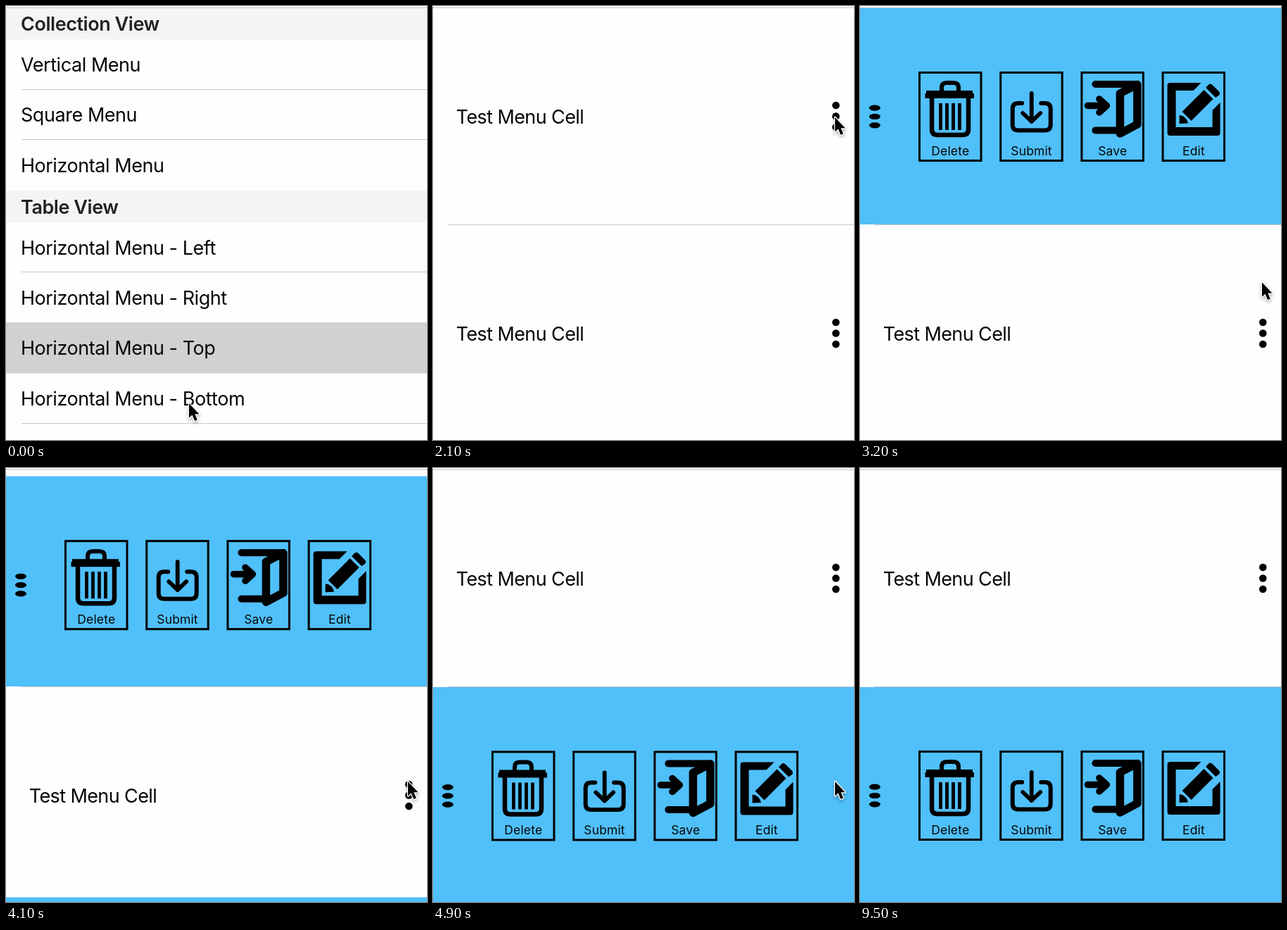
These frames come from a looping animation (598 px wide and 616 px high, 9.6 s). An HTML page with a canvas:

```html
<!DOCTYPE html>
<html lang="en">
<head>
<meta charset="utf-8">
<title>Slide-out cell menu</title>
<style>
html, body { margin: 0; width: 598px; height: 616px; overflow: hidden; background: #fefdff; }
canvas { display: block; width: 598px; height: 616px; }
</style>
</head>
<body>
<canvas id="stage" width="598" height="616"></canvas>
<script>
const W = 598, H = 616, LOOP = 9600, STEP = 100;
const PAGE_W = 602, CELL_H = 308, SLIDE = 940;
const WHITE = '#fefdff', LINE = '#c9c8cc', BLUE = '#50c0fa';
const ctx = document.getElementById('stage').getContext('2d');

const clamp = x => Math.min(1, Math.max(0, x));
const easeOut = x => 1 - (1 - x) ** 2;
const easeIn = x => x * x;
const linear = x => x;

// cubic-bezier(.42, 0, .58, 1)
function easeInOut(x) {
  let lo = 0, hi = 1;
  for (let i = 0; i < 24; i++) {
    const s = (lo + hi) / 2;
    const bx = 1.26 * s * (1 - s) ** 2 + 1.74 * s * s * (1 - s) + s ** 3;
    if (bx < x) lo = s; else hi = s;
  }
  return lo * lo * (3 - 2 * lo);
}
const slide = (t, start) => easeInOut(clamp((t - start) / SLIDE));

// critically damped spring
function spring(t) {
  const k = Math.max(0, t) * 0.017;
  return 1 - (1 + k) * Math.exp(-k);
}

function rect(color, x, y, w, h) {
  ctx.fillStyle = color;
  ctx.fillRect(x, y, w, h);
}

function text(str, x, y, { weight = 400, size = 27, spacing = -0.45, align = 'left', color = '#060606' } = {}) {
  ctx.font = `${weight} ${size}px Inter, sans-serif`;
  ctx.letterSpacing = spacing + 'px';
  ctx.textAlign = align;
  ctx.fillStyle = color;
  ctx.fillText(str, x, y);
}

function dots(x, y, rx, ry, gap) {
  ctx.fillStyle = '#000';
  for (const i of [-1, 0, 1]) {
    ctx.beginPath();
    ctx.ellipse(x, y + i * gap, rx, ry, 0, 0, 7);
    ctx.fill();
  }
}

function stroke(d, width, cap = 'round') {
  ctx.strokeStyle = '#000';
  ctx.lineWidth = width;
  ctx.lineCap = cap;
  ctx.lineJoin = 'round';
  ctx.stroke(new Path2D(d));
}

function fill(d) {
  ctx.fillStyle = '#000';
  ctx.fill(new Path2D(d));
}

const items = [
  ['Delete', () => {
    stroke('M33 28V23q0-7 7-7h10q7 0 7 7V28', 6, 'butt');
    fill('M11 27H77V31H79V38H9.500V31H11Z');
    stroke('M19 37V82q0 8 8 8H63q8 0 8-8V37', 6.5, 'butt');
    stroke('M31.500 45V83M40.500 45V83M49.500 45V83M58.500 45V83', 4.8, 'butt');
  }],
  ['Submit', () => {
    stroke('M32 45H26.500q-8 0-8 8V75.500q0 8 8 8H64.500q8 0 8-8V53q0-8-8-8H59', 6);
    stroke('M45.500 31V71M33 59L45.500 71L58 59', 5.8);
  }],
  ['Save', () => {
    stroke('M21 18H80M21 83.500H52', 10);
    stroke('M56 31L80.500 18.500V75L56 88Z', 11.5);
    stroke('M10 48.500H36M26.500 39L37 48.500L26.500 58', 9.5);
  }],
  ['Edit', () => {
    fill('M12 16H56L45 27H20V79H72V55L83 44V87q0 4-4 4H12q-4 0-4-4V20q0-4 4-4Z');
    fill('M29 57L60 26L73 39L42 70Z');
    fill('M25 74V62q10 1 12.500 11.500Z');
    fill('M62.500 23L66 19q3-3 6 0L81 28q3 3 0 6L76.500 37Z');
  }]
];

function menu(y) {
  rect(BLUE, 0, y, W, CELL_H);
  dots(21, y + 154.5, 8, 4.1, 12.3);
  items.forEach(([label, icon], i) => {
    ctx.save();
    ctx.translate(83 + i * 115.2, y + 90.5);
    ctx.strokeStyle = '#000';
    ctx.lineWidth = 3;
    ctx.lineJoin = 'miter';
    ctx.strokeRect(1.5, 1.5, 87.5, 125);
    icon();
    text(label, 45.3, 118.5, { size: 17.5, spacing: 0.15, align: 'center' });
    ctx.restore();
  });
}

function listPage(selected) {
  const rowH = 71.4;
  const section = (title, y, rows) => {
    rect('#f4f3f6', -20, y, 900, 45);
    text(title, 21, y + 32.5, { weight: 600, color: '#222224' });
    rows.forEach((row, i) => {
      const top = y + 45 + i * rowH;
      if (row === selected) rect('#d1d0d3', -20, Math.round(top) - 1, 900, rowH + 1);
      text(row, 21, top + 45.5);
      if (row !== selected && (i < rows.length - 1 || rows.length > 3)) {
        rect(LINE, 22, Math.round(top + rowH) - 1, 900, 1);
      }
    });
  };
  rect(WHITE, -20, 0, 900, H);
  section('Collection View', 2.5, ['Vertical Menu', 'Square Menu', 'Horizontal Menu']);
  section('Table View', 262, ['Left', 'Right', 'Top', 'Bottom'].map(s => 'Horizontal Menu - ' + s));
}

function cell(top, open) {
  ctx.save();
  ctx.beginPath();
  ctx.rect(-3, Math.round(top), PAGE_W, CELL_H - 1);
  ctx.clip();
  text('Test Menu Cell', 32.7, top + 164, { spacing: -0.6 });
  dots(572.3, top + 154, 5.3, 5.3, 15.5);
  if (open > 0) menu(top + CELL_H * (1 - open));
  ctx.restore();
}

function cellPage(t) {
  rect(WHITE, -3, 0, PAGE_W + 40, H);
  rect(LINE, 21, 310, W, 1);
  const second = slide(t, 3985);
  cell(2.5, slide(t, 2255) - second);
  cell(310.5, second);
}

// start, end, from, to, easing
const moves = [
  [850, 1300, [260, 564], [389, 322], easeIn],
  [1300, 2100, [389, 322], [571, 158], easeOut],
  [2800, 3500, [571, 158], [571, 445], easeOut],
  [4950, 5500, [571, 445], [108, -40], linear]
];

function cursor(t) {
  const [start, end, a, b, ease] = moves.filter(m => t >= m[0]).pop() || moves[0];
  const k = ease(clamp((t - start) / (end - start)));
  ctx.save();
  ctx.translate(a[0] + (b[0] - a[0]) * k, a[1] + (b[1] - a[1]) * k);
  const arrow = new Path2D('M0 0V20.500L4.500 16.500L8.200 25L11.800 23.300L8.300 15.200H14.500Z');
  ctx.shadowColor = 'rgba(0,0,0,.35)';
  ctx.shadowBlur = 4;
  ctx.shadowOffsetY = 2;
  ctx.lineWidth = 2.6;
  ctx.lineJoin = 'round';
  ctx.strokeStyle = '#fff';
  ctx.stroke(arrow);
  ctx.shadowColor = 'transparent';
  ctx.fillStyle = '#000';
  ctx.fill(arrow);
  ctx.restore();
}

function draw(t) {
  const push = spring(t - 500);
  const pushing = push < 0.999;
  if (pushing) {
    ctx.save();
    ctx.translate(-0.3 * PAGE_W * push, 0);
    listPage('Horizontal Menu - ' + (t < 400 ? 'Top' : 'Bottom'));
    ctx.restore();
    rect(`rgba(0,0,0,${0.1 * push})`, 0, 0, W, H);
  }
  ctx.save();
  ctx.translate(pushing ? PAGE_W * (1 - push) : 0, 0);
  if (push > 0) cellPage(t);
  ctx.restore();
  rect('#f9f8fa', 0, 0, W, 2);
  rect('#c3c2c6', 0, 2, W, 1);
  cursor(t);
}

function frame() {
  const t = performance.now() % LOOP;
  draw(Math.floor(t / STEP) * STEP);
  requestAnimationFrame(frame);
}
frame();
</script>
</body>
</html>
```
